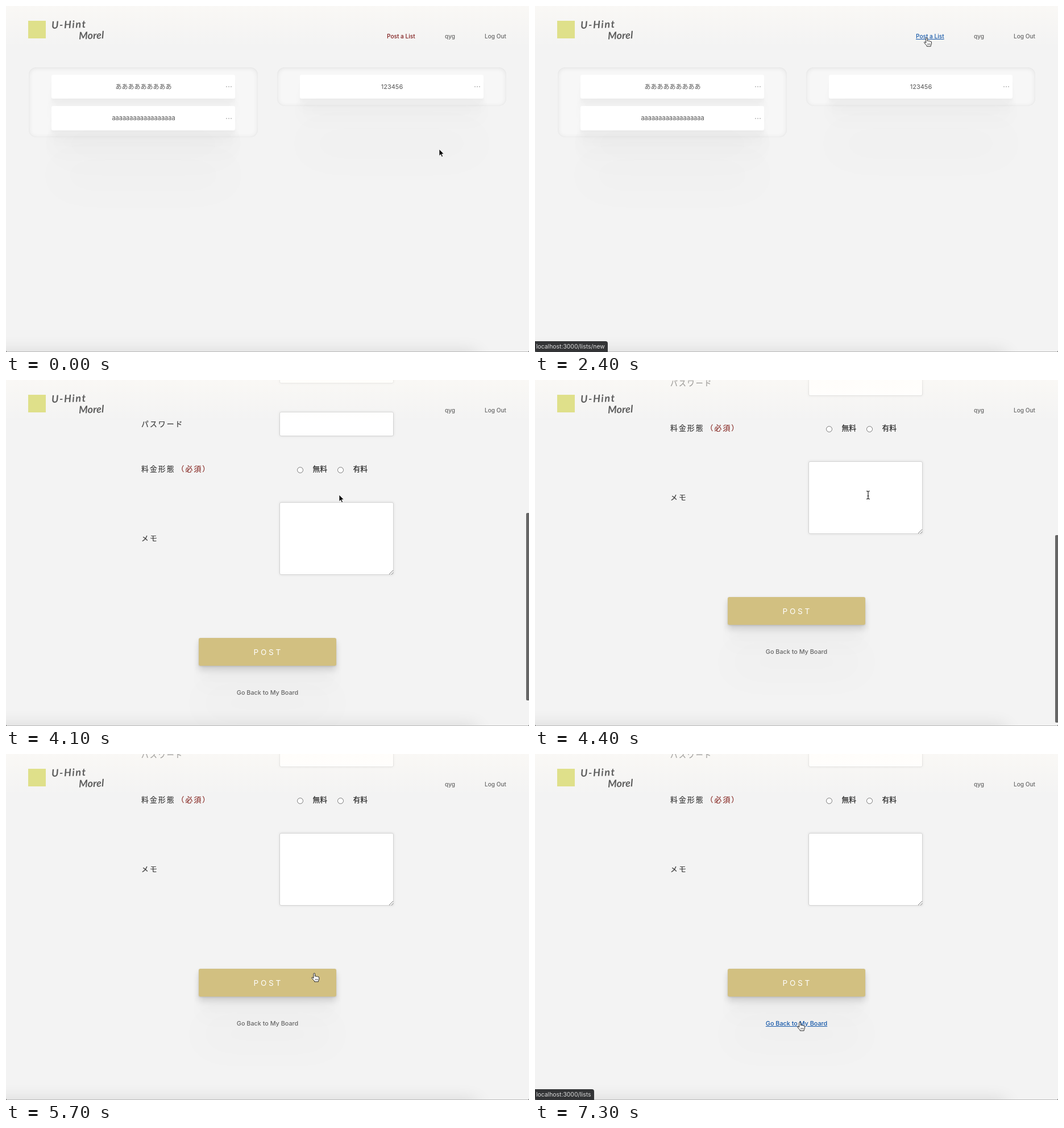
Recreate the animation shown at these times as an HTML page. Size 920x609 px, loop 7.4 s.

```html
<!DOCTYPE html>
<html lang="ja">
<head>
<meta charset="utf-8">
<style>
html, body { margin: 0; width: 100%; height: 100%; overflow: hidden; background: #333; }
#stage { position: relative; width: 920px; height: 609px; overflow: hidden; background: #f3f3f3;
  border-radius: 0 0 3px 3px; font: 500 11px/20px Inter, "Noto Sans CJK JP", sans-serif; color: #666; }
#stage div, #stage svg { position: absolute; box-sizing: border-box; }
#header, #dock, #cursor, #cursor * { pointer-events: none; }
.text { white-space: pre; }
.mid { transform: translateX(-50%); }
.panel { border-radius: 13px; background: #f7f7f7;
  box-shadow: inset 0 1px 9px rgba(0,0,0,.085), inset 0 0 2px rgba(0,0,0,.04); }
.card, .button { border-radius: 3px; background: #fff;
  box-shadow: 0 3px 2px rgba(0,0,0,.008), 0 7px 5px rgba(0,0,0,.011), 0 12px 10px rgba(0,0,0,.014),
    0 22px 18px rgba(0,0,0,.015), 0 42px 33px rgba(0,0,0,.014), 0 100px 80px rgba(0,0,0,.025); }
.button { background: #d2c081; box-shadow: 0 1px 3px rgba(0,0,0,.12), 0 7px 12px rgba(0,0,0,.14),
  0 22px 18px rgba(0,0,0,.015), 0 42px 33px rgba(0,0,0,.014), 0 90px 70px rgba(0,0,0,.025); }
.field { border: 1px solid #d2d2d2; border-radius: 3px; background: #fff; box-shadow: 0 0 5px rgba(0,0,0,.09); }
.radio { border: 1px solid #777; border-radius: 50%; background: #fff; }
.dot { border-radius: 50%; background: #b5b5b5; }
.title { font-weight: 400; color: #555; }
.label { font-size: 12.8px; letter-spacing: 2.1px; color: #3a3a3a; -webkit-text-stroke: .2px; }
.label b { margin-left: 3px; font-weight: 500; color: #8a2f2a; }
.nav { font-size: 10.1px; }
.post { color: #7d1a1a; }
.word { font: italic 700 18px/20px Lato, cursive; color: #5d5d5d; transform: rotate(-2deg); }
.hover { color: #1457a8; text-decoration: underline; }
#header { width: 920px; height: 74px; background: linear-gradient(rgba(255,252,247,.55), rgba(255,252,247,0)); }
#dock { left: -60px; top: 609px; width: 888px; height: 60px; box-shadow: 0 0 30px rgba(0,0,0,.12); }
#edge { left: 0; top: 608px; width: 920px; height: 1px; background: #bbb; }
#thumb { left: 915px; width: 5px; height: 330px; background: #666; border-radius: 2px 0 0 2px; }
#status { left: 0; top: 590px; height: 19px; padding: 0 5px 0 2px; border-radius: 0 4px 0 0;
  background: #333436; color: #ddd; font: 400 10.4px/19px Inter, sans-serif; }
#cursor { left: 0; top: 0; overflow: visible; stroke-linejoin: round; }
</style>
</head>
<body>
<div id="stage">
  <div id="board"></div>
  <div id="form"></div>
  <div id="header"></div>
  <div id="links"></div>
  <div id="dock"></div>
  <div id="edge"></div>
  <div id="thumb"></div>
  <div id="status"></div>
  <svg id="cursor" width="1" height="1">
    <path id="arrow" d="M0 0V11.8L2.7 9.3 4.5 13.6 6.5 12.8 4.7 8.6H8.3Z" stroke="#fff" stroke-width=".8"/>
    <g id="hand" stroke="#222" fill="#fff">
      <path d="M-1.3 9V1.4Q-1.3 0 0 0T1.3 1.4V5.5Q2.6 4.4 3.8 5.9 5.2 5 6.3 6.4 8.4 5.8 8.4 8V10.5Q8 12.5 7.2 13.5V15H.2V13.8Q-2 11.5-4.4 8.6-4.6 7.2-3.2 7.2Z"/>
      <path d="M1.9 10V12.5M3.9 10V12.5M5.9 10V12.5" stroke-width=".8"/>
    </g>
    <path id="beam" d="M-3-6.5Q0-6.5 0-5Q0-6.5 3-6.5M0-5V6M-3 7.5Q0 7.5 0 6Q0 7.5 3 7.5M-1.5 2H1.5" fill="none" stroke="#222" stroke-width="1.2"/>
  </svg>
</div>
<script>
const $ = id => document.getElementById(id);
const board = $('board'), form = $('form'), header = $('header'), links = $('links');

function add(parent, cls, style, html = '') {
  const el = document.createElement('div');
  el.className = cls;
  el.style.cssText = style;
  el.innerHTML = html;
  parent.append(el);
  return el;
}
const box = (parent, cls, x, y, w, h) =>
  add(parent, cls, `left:${x}px;top:${y}px;width:${w}px;height:${h}px`);
// y is the vertical centre of the line
const text = (parent, cls, x, y, html, style = '') =>
  add(parent, 'text ' + cls, `left:${x}px;top:${y - 10}px;${style}`, html);

function panel(x, titles) {
  box(board, 'panel', x, 108, 403, 12.5 + titles.length * 55.3);
  titles.forEach((title, row) => {
    const y = 120.5 + row * 55.5;
    box(board, 'card', x + 40.3, y, 323, 42.5);
    text(board, 'mid title', x + 202, y + 21, title);
    for (let i = 0; i < 3; i++) box(board, 'dot', x + 346.5 + i * 4.3, y + 20.5, 2.4, 2.4);
  });
}
panel(40, ['あ'.repeat(9), 'a'.repeat(18)]);
panel(477, ['123456']);

const must = '<b>（必須）</b>';
text(form, 'label', 389.5, 132, 'リストを投稿する', 'font-size:13px;letter-spacing:4.8px');
['タイトル' + must, 'URL', 'メールアドレス', 'パスワード'].forEach((label, i) => {
  const y = 230 + i * 93.7;
  text(form, 'label', 238, y, label);
  box(form, 'field', 480.5, y - 21.5, 201.5, 43);
});
text(form, 'label', 238, 590, '料金形態' + must);
['無料', '有料'].forEach((label, i) => {
  const x = 511.5 + i * 71;
  box(form, 'radio', x, 586, 11, 11);
  text(form, 'label', x + 28, 590, label, 'letter-spacing:0;color:#222');
});
text(form, 'label', 238, 712, 'メモ');
box(form, 'field', 480.5, 648.5, 201.5, 128);
add(form, '', 'left:673px;top:767px', '<svg width="9" height="9" stroke="#777"><path d="M1 8L8 1M5 8L8 5"/></svg>');
box(form, 'button', 339, 887, 242, 49);
text(form, 'mid', 461.3, 912, 'POST', 'font-size:13.6px;font-weight:400;letter-spacing:3.8px;color:#fff;pointer-events:none');
const back = text(form, 'mid link', 460, 984.5, 'Go Back to My Board', 'font-size:10.8px');

box(header, '', 39, 26, 31, 31).style.background = '#dfe08a';
text(header, 'word', 80, 32, 'U-Hint', 'letter-spacing:1.6px');
text(header, 'word', 128, 51, 'Morel');
const post = text(links, 'nav link post', 670, 53, 'Post a List');
text(links, 'nav link', 772, 53, 'qyg');
text(links, 'nav link', 842, 53, 'Log Out');

const clamp = v => Math.min(1, Math.max(0, v));

// Each move ends at (x, y); the exponents bend its path
const moves = [
  { from: 600, to: 1300, x: 689, y: 56, ex: 1, ey: 1 },
  { from: 3000, to: 3600, x: 586, y: 202, ex: .7, ey: 1.6 },
  { from: 5500, to: 6100, x: 466, y: 472, ex: .92, ey: .35 },
];
function pointer(t) {
  let x = 762, y = 252;
  for (const m of moves) {
    const p = clamp((t - m.from) / (m.to - m.from));
    x += (m.x - x) * p ** m.ex;
    y += (m.y - y) * p ** m.ey;
  }
  return [x, y];
}
const scrollAt = t => 509.3 * (1 - Math.exp(-((Math.max(0, t - 3800) / 185) ** 1.33)));

const under = ([x, y]) => document.elementFromPoint(x, y);
function shapeOver(el) {
  if (el?.matches('.link, .button')) return 'hand';
  return el?.matches('.field') ? 'beam' : 'arrow';
}

function draw(now) {
  const t = Math.floor(now % 7400 / 100) * 100;
  const onForm = t >= 2700;
  board.hidden = post.hidden = onForm;
  form.hidden = !onForm;

  const scroll = scrollAt(t);
  form.style.top = -scroll + 'px';
  $('thumb').style.top = scroll * .5455 - 2 + 'px';
  $('thumb').style.opacity = t < 3900 ? 0 : clamp((5300 - t) / 300);

  const atPost = t >= 1800 && t < 3100, atBack = t >= 6700;
  $('status').textContent = 'localhost:3000/lists' + (atPost ? '/new' : '');
  $('status').hidden = !atPost && !atBack;

  // Link colours follow the pointer one step late
  const lit = under(pointer(t - 100));
  for (const link of [post, back]) link.classList.toggle('hover', link === lit);

  const spot = pointer(t), shape = shapeOver(under(spot));
  for (const id of ['arrow', 'hand', 'beam']) $(id).style.display = id === shape ? '' : 'none';
  $('cursor').style.transform = `translate(${spot.join('px,')}px)`;
  requestAnimationFrame(draw);
}
requestAnimationFrame(draw);
</script>
</body>
</html>
```
